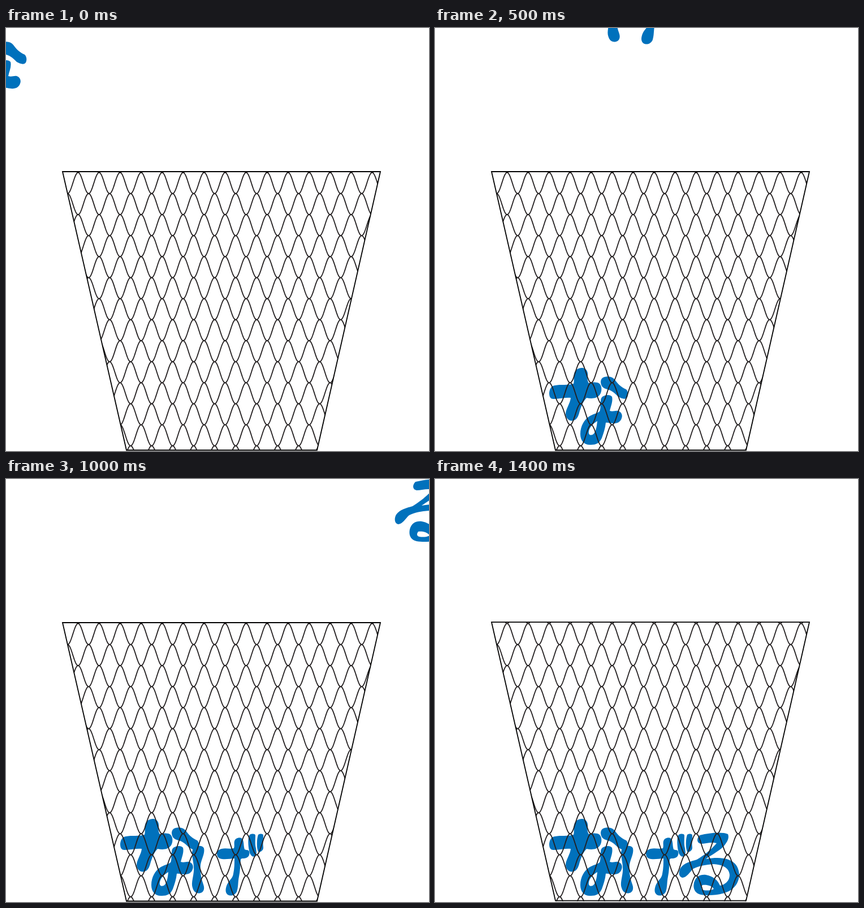
Recreate the animation shown at these times as an HTML page. Size 748 px wide and 748 px high, loop 1.9 s.

```html
<!DOCTYPE html>
<html lang="ja">
<head>
<meta charset="utf-8">
<title>なげる</title>
<style>
  html, body { margin: 0; height: 100%; overflow: hidden; background: #fff; }
  svg { display: block; width: 100vw; height: 100vh; }
  .glyph { fill: #0071bc; }
  .hole { fill: #fff; }
  .wire { fill: none; stroke: #231f20; stroke-width: 1.8; }
  .frame { fill: none; stroke: #000; stroke-width: 1.8; }
</style>
</head>
<body>
<svg viewBox="0 0 748 748">
  <clipPath id="inside"><path d="M100 254H662L550 746.5H213Z"/></clipPath>

  <g id="na" class="glyph">
    <path d="M212 632C222 630 236 632 245 629C247 622 244 618 246 611C249 602 256 601 261 601C268 602 271 608 270 616C269 621 270 625 272 628C280 626 287 626 291 629C296 634 295 644 291 649C286 655 278 656 268 654C261 661 259 669 256 677C254 685 252 692 245 694C237 696 231 690 231 682C232 672 239 664 240 654C231 653 221 656 210 656C203 656 202 651 202 645C203 637 206 633 212 632Z"/>
    <path d="M300 617C308 615 314 617 318 622C323 629 329 635 338 639C342 643 342 649 340 653C337 658 329 655 324 652C318 646 313 641 305 639C296 637 293 632 293 625C294 620 296 618 300 617Z"/>
    <path d="M296 652C302 648 310 648 313 652C315 660 311 668 309 677C315 679 319 676 324 677C330 679 332 685 330 690C328 697 321 700 314 699C309 699 305 697 302 698C301 708 298 716 295 725C291 734 285 737 276 737C264 738 257 730 257 718C257 704 264 692 274 686C281 682 288 681 291 678C294 672 291 666 293 660C293 656 294 654 296 652Z"/>
    <path class="hole" d="M287 695C280 699 273 706 272 713C271 719 274 721 279 719C284 716 286 706 287 695Z"/>
  </g>

  <g id="ge" class="glyph">
    <path d="M335 650C341 648 348 648 350 653C352 662 346 671 344 682C343 695 345 706 349 717C352 725 349 731 344 732C337 734 332 730 330 723C327 715 331 705 332 694C333 681 329 671 329 660C330 654 332 651 335 650Z"/>
    <path d="M381 654C389 652 396 655 403 653C405 648 402 643 405 638C409 633 417 633 419 638C421 645 420 649 422 655C426 657 429 655 430 659C432 666 427 671 420 671C417 671 416 671 415 673C414 684 414 694 412 703C410 712 411 722 408 730C404 737 397 738 392 735C387 731 388 724 391 717C395 709 401 706 402 698C404 688 404 680 404 671C397 671 390 673 382 672C375 671 373 667 373 662C374 657 377 655 381 654Z"/>
    <path d="M431 629C435 627 440 627 441 630C441 638 440 645 442 653C443 660 444 664 440 667C436 669 433 666 431 661C428 651 428 640 429 632Z"/>
    <path d="M446 629C450 627 454 627 455 630C455 638 454 645 455 652C455 657 449 661 446 659C443 654 443 637 446 629Z"/>
  </g>

  <g id="ru" class="glyph">
    <path d="M520 390C540 385 560 384 570 388C573 395 568 403 562 410C554 418 542 424 531 432C560 427 578 432 586 445C594 460 589 478 575 487C558 497 535 497 522 495C511 492 508 484 510 474C513 463 521 459 531 460C543 462 552 469 556 479C566 477 573 470 573 460C572 447 560 442 545 441C530 442 520 444 509 449C502 455 498 464 490 465C483 464 482 455 486 448C492 439 505 436 515 433C527 426 541 415 550 404C541 401 531 405 522 405C515 404 514 396 520 390Z"/>
    <path class="hole" d="M525 478C522 482 522 486 527 487C532 488 539 488 545 485C542 479 532 477 525 478Z"/>
  </g>

  <path id="mesh" class="wire" clip-path="url(#inside)"/>
  <path id="frame" class="frame" d="M100 254H662L550 746.5H213Z"/>
</svg>
<script>
const LOOP = 1900, STEP = 100, LAST = 1400;
const $ = id => document.getElementById(id);

// Flight of each character: [time, dx, dy]
const flights = {
  na: [[0, -305, -592], [300, -46, -138], [400, 0, 0]],
  ge: [[500, -23.5, -708], [800, 2, -113], [900, 0, 0]],
  ru: [[1000, 204, -385], [1200, 0, 0], [1300, -40, 150], [1400, -52, 240]]
};

// Netting: touching sine waves, every other row in antiphase
function meshPath() {
  const pitch = 37.14, rowHeight = 37.17, crestX = 127.5, top = 255.6;
  let d = '';
  for (let row = -1; row < 14; row++) {
    const sign = row % 2 ? -1 : 1;
    for (let x = 98; x <= 664; x++) {
      const wave = 1 - sign * Math.cos((x - crestX) / pitch * 2 * Math.PI);
      const y = top + rowHeight * (row + wave / 2);
      d += (x === 98 ? 'M' : 'L') + x + ' ' + y.toFixed(2);
    }
  }
  return d;
}

function positionAt(keys, t) {
  const next = keys.findIndex(key => key[0] > t);
  if (next < 0) return keys[keys.length - 1].slice(1);
  const [t0, x0, y0] = keys[next - 1], [t1, x1, y1] = keys[next];
  const k = (t - t0) / (t1 - t0);
  return [x0 + (x1 - x0) * k, y0 + (y1 - y0) * k];
}

function draw(now) {
  const t = Math.min(LAST, Math.floor(now % LOOP / STEP) * STEP);
  for (const id in flights) {
    const keys = flights[id], visible = t >= keys[0][0];
    $(id).style.display = visible ? '' : 'none';
    if (visible) $(id).setAttribute('transform', `translate(${positionAt(keys, t)})`);
  }
  $('frame').setAttribute('transform', `translate(0 ${t >= 1300 ? -0.8 : 0})`);
}

$('mesh').setAttribute('d', meshPath());
const start = performance.now();
function tick() {
  draw(performance.now() - start);
  requestAnimationFrame(tick);
}
tick();
</script>
</body>
</html>
```
